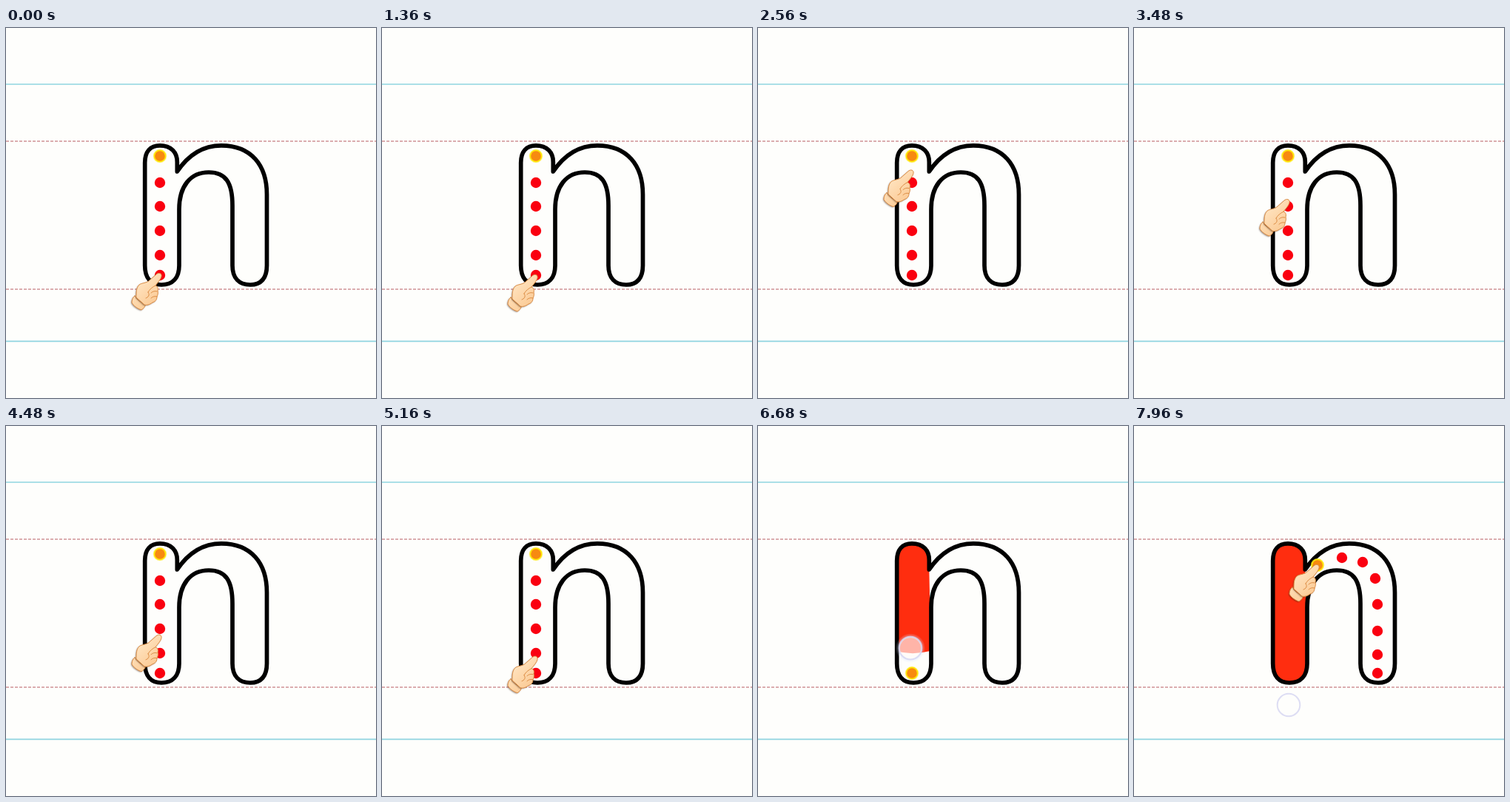
An HTML page with a canvas for the animation above (8000 ms loop, 500x500 px).

```html
<!DOCTYPE html>
<html lang="en">
<head>
<meta charset="utf-8">
<title>Trace the letter n</title>
<style>
html, body { margin: 0; width: 100%; height: 100%; overflow: hidden; background: #fefefc; }
canvas { display: block; }
</style>
</head>
<body>
<canvas id="stage" width="500" height="500"></canvas>
<script>
const ctx = document.getElementById('stage').getContext('2d');
const LOOP = 8000, TOUCH = 5320, DONE = 6960, LIFT = 7560, HINT = 7760;

const cap = 'M187.7 182C187.7 167 195 158.8 208 158.8C223 158.8 231.3 168 231.3 181L231.3 194';
const foot = 'L234 321C234 338 225 347 210 347C196 347 187.7 338 187.7 321Z';
const letter = new Path2D(cap +
  'C246 172 266 158.8 291 158.8C331 158.8 352.5 185 352.5 225L352.5 321' +
  'C352.5 338 345 347 330 347C315 347 306 338 306 321L306 240' +
  'C306 209 297 195 274 195C249 195 234 214 234 245' + foot);
const stem = new Path2D(cap + foot);

const stemDots = [173, 209, 241, 274, 307, 334].map(y => [208, y]);
const archDots = [[248, 188], [281, 178], [309, 184], [326, 206],
  [329, 241], [329, 277], [329, 309], [329, 334]];

// Finger position: time, x, y
const touchKeys = [[TOUCH, 205, 170], [5640, 203, 174], [5880, 203, 192], [6400, 205, 262],
  [DONE, 207, 338], [7240, 207, 366], [7400, 207.5, 374], [LIFT, 209, 377], [LOOP, 209, 377]];

// Hand parts, relative to the fingertip dot
const handShape = new Path2D('M-5 1C-2 -2 3 -1 2 4C1 8 -3 12 -6 16' +
  'C-3 17 -2 20 -3 23C-2 26 -3 29 -4 31C-4 36 -7 38 -10 39C-14 42 -18 43 -21 42' +
  'L-32 32C-32 25 -32 19 -28 15C-24 12 -18 13 -14 9Z');
const cuff = new Path2D('M-34 30C-31 35 -26 39 -20 41C-19 44 -22 47 -25 49' +
  'C-31 47 -36 43 -38 39C-38 35 -36 31 -34 30Z');
const creases = new Path2D('M-6 16C-10 18 -14 21 -16 25M-4 24C-7 23 -10 24 -12 26' +
  'M-4 31C-7 30 -10 31 -12 33M-16 25C-13 29 -16 32 -19 33');

function along(keys, t) {
  let i = 1;
  while (i < keys.length - 1 && keys[i][0] < t) i++;
  const a = keys[i - 1], b = keys[i];
  const p = Math.min(1, Math.max(0, (t - a[0]) / (b[0] - a[0])));
  return [a[1] + (b[1] - a[1]) * p, a[2] + (b[2] - a[2]) * p];
}

function rule(y, color, width, dash) {
  ctx.setLineDash(dash);
  ctx.strokeStyle = color;
  ctx.lineWidth = width;
  ctx.beginPath();
  ctx.moveTo(0, y);
  ctx.lineTo(500, y);
  ctx.stroke();
  ctx.setLineDash([]);
}

function disc(x, y, r, fill) {
  ctx.fillStyle = fill;
  ctx.beginPath();
  ctx.arc(x, y, r, 0, Math.PI * 2);
  ctx.fill();
}

function drawDots(dots, next) {
  dots.slice(next).forEach(([x, y], i) => {
    if (i) return disc(x, y, 7.2, '#fa0010');
    disc(x, y, 9.3, 'rgba(255,240,60,.5)');
    disc(x, y, 8.5, '#ffe60a');
    disc(x, y, 6.8, '#f78a10');
  });
}

function drawHand(x, y) {
  ctx.save();
  ctx.translate(x, y);
  ctx.lineJoin = ctx.lineCap = 'round';
  const skin = ctx.createLinearGradient(-28, 14, -6, 38);
  skin.addColorStop(0, '#ffe2bd');
  skin.addColorStop(1, '#fbcb96');
  ctx.strokeStyle = '#dc8d45';
  ctx.lineWidth = 1;
  for (const part of [cuff, handShape]) {
    ctx.shadowColor = 'rgba(60,30,10,.5)';
    ctx.shadowBlur = 2;
    ctx.shadowOffsetX = -1;
    ctx.shadowOffsetY = 1;
    ctx.fillStyle = skin;
    ctx.fill(part);
    ctx.shadowColor = 'transparent';
    ctx.stroke(part);
  }
  ctx.stroke(creases);
  ctx.restore();
}

function drawGlow(x, y, alpha) {
  ctx.globalAlpha = alpha;
  const halo = ctx.createRadialGradient(x, y, 13, x, y, 20);
  halo.addColorStop(0, 'rgba(215,228,255,.7)');
  halo.addColorStop(1, 'rgba(215,228,255,0)');
  ctx.beginPath();
  ctx.arc(x, y, 20, 0, Math.PI * 2);
  ctx.arc(x, y, 14, 0, Math.PI * 2, true);
  ctx.fillStyle = halo;
  ctx.fill();
  disc(x, y, 15, 'rgba(255,250,248,.66)');
  ctx.globalAlpha = 1;
  ctx.strokeStyle = 'rgba(216,216,243,.85)';
  ctx.lineWidth = 2;
  ctx.beginPath();
  ctx.arc(x, y, 15.3, 0, Math.PI * 2);
  ctx.stroke();
}

function fillStem(level) {
  ctx.save();
  ctx.clip(stem);
  ctx.fillStyle = '#ff2d0f';
  ctx.beginPath();
  ctx.moveTo(180, 150);
  ctx.lineTo(240, 150);
  ctx.lineTo(240, level - 3);
  ctx.quadraticCurveTo(208, level + 7, 180, level - 3);
  ctx.fill();
  ctx.restore();
}

function hintY(t) {
  const start = t < 1400 ? -4550 : 1450;
  const p = Math.min(1, Math.max(0, (t - start) / 4900));
  return 173 + 161 * (1 - Math.cos(Math.PI * p)) / 2;
}

function draw(t) {
  const touching = t >= TOUCH, done = t >= DONE;
  const [x, y] = along(touchKeys, t);

  ctx.fillStyle = '#fefefc';
  ctx.fillRect(0, 0, 500, 500);
  rule(76, '#8fd4e0', 1.6, []);
  rule(423.4, '#8fd4e0', 1.6, []);
  rule(153, '#cf9297', 1.3, [4, 2]);
  rule(353, '#cf9297', 1.3, [4, 2]);

  if (touching) fillStem(done ? 360 : y + 5);
  ctx.strokeStyle = '#000';
  ctx.lineWidth = 5.7;
  ctx.lineJoin = 'round';
  ctx.stroke(letter);

  if (done) drawDots(archDots, 0);
  else drawDots(stemDots, touching ? stemDots.filter(d => d[1] < y + 8).length : 0);

  if (touching) drawGlow(x, y, t < LIFT ? 1 : Math.max(0, 1 - (t - LIFT) / 400));
  else drawHand(208, hintY(t));
  if (t >= HINT) drawHand(248, 188);
}

function frame() {
  draw(performance.now() % LOOP);
  requestAnimationFrame(frame);
}
frame();
</script>
</body>
</html>
```
